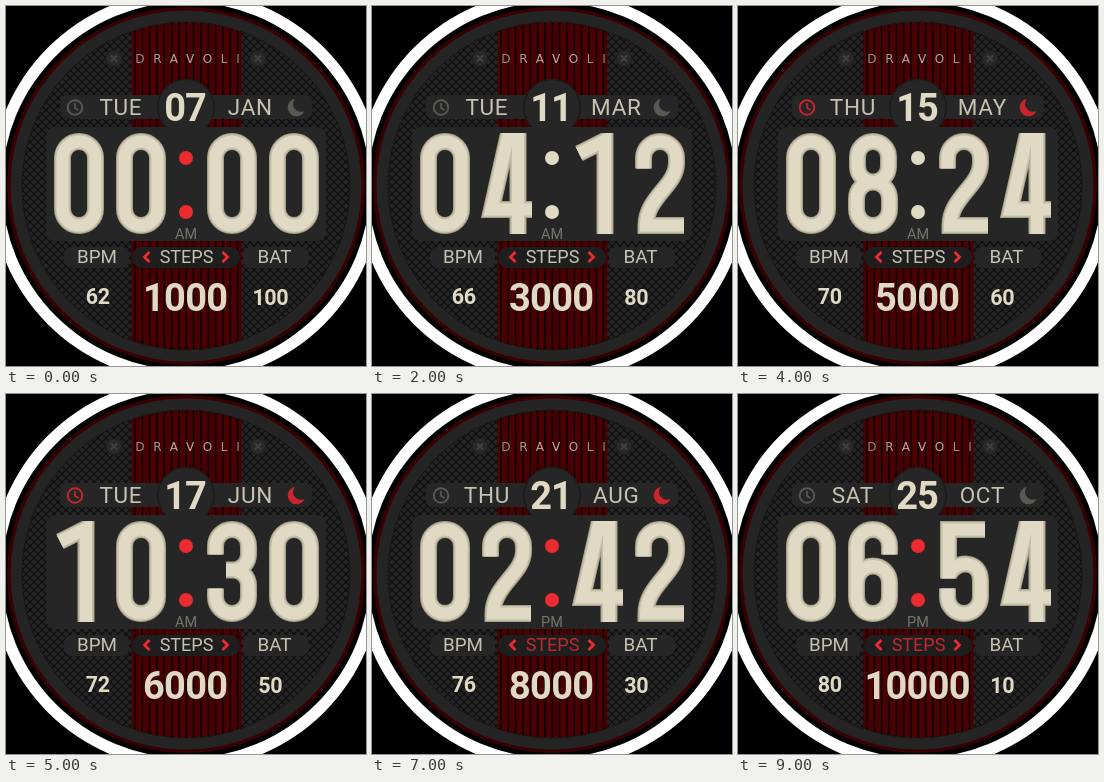
Animation, 360 px wide and 360 px high, one loop 10000 ms. Source, as an HTML page with a canvas:

```html
<!DOCTYPE html>
<html lang="en">
<head>
<meta charset="utf-8">
<title>Watch face</title>
<style>
html, body { margin: 0; width: 100%; height: 100%; overflow: hidden; background: #000; }
canvas { display: block; width: 360px; height: 360px; }
</style>
</head>
<body>
<canvas id="face"></canvas>
<script>
const SIZE = 360, C = 180, TAU = Math.PI * 2;
const CREAM = '#e0dac4', SOFT = '#c6c2b2', RED = '#ec2b30', DIM = '#5b5854', PANEL = '#262626';
const MONTHS = ['JAN', 'FEB', 'MAR', 'APR', 'MAY', 'JUN', 'JUL', 'AUG', 'SEP', 'OCT'];
const DAYS = ['SUN', 'MON', 'TUE', 'WED', 'THU', 'FRI', 'SAT'];

// Centre lines of the clock digits; x is centred, y runs from 0 to 84.
const GLYPHS = {
  0: 'M-16.5 16.5A16.5 16.5 0 0 1 16.5 16.5V67.5A16.5 16.5 0 0 1-16.5 67.5Z',
  1: 'M-19 12L7-1V94',
  2: 'M-16.5 27V16.5A16.5 16.5 0 0 1 16.5 16.5V22C16.5 44-14 56-14 84H24',
  3: 'M-16.5 25V16.5A16.5 16.5 0 0 1 16.5 16.5V25A15.5 15.5 0 0 1 1 40.5H-6M1 40.5A15.5 15.5 0 0 1 16.5 56V67.5A16.5 16.5 0 0 1-16.5 67.5V59',
  4: 'M11 94V-9M2-10L-15.5 68H25',
  5: 'M21 0H-15.5V49M-15.5 46C-9 30 16.5 30 16.5 51V67.5A16.5 16.5 0 0 1-16.5 67.5V59',
  6: 'M16.5 25V16.5A16.5 16.5 0 0 0-16.5 16.5V67.5A16.5 16.5 0 0 0 16.5 67.5V53A16.5 16.5 0 0 0-16.5 53',
  8: 'M-15.5 15.5A15.5 15.5 0 0 1 15.5 15.5V25A15.5 15.5 0 0 1-15.5 25ZM-16.5 57A16.5 16.5 0 0 1 16.5 57V67.5A16.5 16.5 0 0 1-16.5 67.5Z'
};
const SLOTS = [73, 135, 226, 288];

const canvas = document.getElementById('face');
const dpr = window.devicePixelRatio || 1;
const ctx = setup(canvas);
const backdrop = document.createElement('canvas');
drawBackdrop(setup(backdrop));

function setup(el) {
  el.width = el.height = SIZE * dpr;
  const g = el.getContext('2d');
  g.scale(dpr, dpr);
  return g;
}

function disc(g, x, y, r, fill) {
  g.beginPath();
  g.arc(x, y, r, 0, TAU);
  g.fillStyle = fill;
  g.fill();
}

function ring(g, x, y, r, width, color) {
  g.beginPath();
  g.arc(x, y, r, 0, TAU);
  g.lineWidth = width;
  g.strokeStyle = color;
  g.stroke();
}

function panel(g, x, y, w, h, r, fill) {
  g.beginPath();
  g.roundRect(x, y, w, h, r);
  g.fillStyle = fill;
  g.fill();
}

function line(g, color, width, ...pts) {
  g.beginPath();
  for (let i = 0; i < pts.length; i += 2) g.lineTo(pts[i], pts[i + 1]);
  g.strokeStyle = color;
  g.lineWidth = width;
  g.stroke();
}

function label(g, str, x, y, size, color, weight = 400, gap = 0, family = 'Roboto') {
  g.font = `${weight} ${size}px ${family}, sans-serif`;
  g.letterSpacing = gap + 'px';
  g.textAlign = 'center';
  g.fillStyle = color;
  g.fillText(str, x + gap / 2, y);
}

// Mesh and red stripe, both seen through the round opening of the bezel.
function drawDial(g) {
  g.save();
  g.beginPath();
  g.arc(C, C, 164, 0, TAU);
  g.clip();
  for (let d = -SIZE; d < SIZE * 2; d += 8) {
    line(g, '#0c0c0c', 1.1, d, 0, d + SIZE, SIZE);
    line(g, '#0c0c0c', 1.1, d, 0, d - SIZE, SIZE);
  }
  g.fillStyle = '#480002';
  g.fillRect(125.5, 0, 110, SIZE);
  for (let x = 129; x < 235; x += 7.33) line(g, '#0c0000', 1.5, x, 0, x, SIZE);
  g.restore();
}

function drawScrew(g, x) {
  disc(g, x, 52.5, 8.5, '#292929');
  ring(g, x, 52.5, 8, 1, '#1c1c1c');
  line(g, '#414141', 2, x - 3, 49.5, x + 3, 55.5);
  line(g, '#414141', 2, x + 3, 49.5, x - 3, 55.5);
}

function chevron(g, x, dir) {
  line(g, RED, 2.8, x + 2.5 * dir, 246, x - 2.5 * dir, 251, x + 2.5 * dir, 256);
}

function drawBackdrop(g) {
  g.fillStyle = '#000';
  g.fillRect(0, 0, SIZE, SIZE);
  disc(g, C, C, 195.5, '#fff');
  disc(g, C, C, 184, '#000');
  disc(g, C, C, 179, '#380003');
  disc(g, C, C, 175.5, '#242424');
  drawDial(g);
  ring(g, C, C, 164, 1, '#161616');

  drawScrew(g, 108);
  drawScrew(g, 252);
  const metal = g.createLinearGradient(128, 0, 236, 0);
  metal.addColorStop(0, '#8d887e');
  metal.addColorStop(0.5, '#b9b4a7');
  metal.addColorStop(1, '#8d887e');
  label(g, 'DRAVOLI', 181.5, 56.5, 12, metal, 400, 8.7, 'DejaVu Sans');

  panel(g, 54, 89, 252, 24, 7, PANEL);
  disc(g, C, 101.5, 29, '#1b1b1b');
  disc(g, C, 101.5, 27.5, PANEL);
  panel(g, 40, 121, 280, 114, 9, PANEL);
  panel(g, 58, 241, 65, 21, 8, PANEL);
  panel(g, 126, 241, 108, 21, 10, '#1e1e1e');
  panel(g, 237, 241, 66, 21, 8, PANEL);
  label(g, 'BPM', 91, 257, 18.8, SOFT);
  label(g, 'BAT', 268.5, 257, 18.8, SOFT);
  chevron(g, 141, 1);
  chevron(g, 219, -1);
}

function drawDigit(ch, slot) {
  const path = new Path2D(GLYPHS[ch]);
  ctx.save();
  ctx.beginPath();
  ctx.rect(40, 127, 280, 101);
  ctx.clip();
  ctx.translate(SLOTS[slot], 135.5);
  [[17, '#a39e88'], [15, '#c6c0a9'], [12, CREAM]].forEach(([width, color]) => {
    ctx.lineWidth = width;
    ctx.strokeStyle = color;
    ctx.stroke(path);
  });
  ctx.restore();
}

function drawAlarm(color) {
  ring(ctx, 69, 101.5, 7.3, 1.9, color);
  line(ctx, color, 1.7, 69, 97, 69, 102, 72.5, 104);
}

function drawMoon(color) {
  ctx.beginPath();
  ctx.arc(290.5, 101.5, 8.8, -1.75, 0.45, true);
  ctx.quadraticCurveTo(291, 107, 287.5, 101);
  ctx.quadraticCurveTo(286.2, 96.5, 288.9, 92.8);
  ctx.fillStyle = color;
  ctx.fill();
}

function drawState(n) {
  ctx.drawImage(backdrop, 0, 0, SIZE, SIZE);
  const two = v => String(v).padStart(2, '0');
  const day = 7 + 2 * n;
  const weekday = DAYS[new Date(2025, n, day).getDay()];

  drawAlarm(n >= 3 && n <= 6 ? '#c9252d' : DIM);
  drawMoon(n >= 4 && n <= 7 ? '#c9252d' : DIM);
  label(ctx, weekday, 114.5, 109, 22.5, SOFT, 400, 0.7);
  label(ctx, MONTHS[n], 244, 109, 22.5, SOFT, 400, 0.7);
  label(ctx, two(day), 179.5, 114.5, 38, CREAM, 700, -1);

  [...two(2 * n % 12) + two(6 * n)].forEach(drawDigit);
  const dots = n >= 1 && n <= 4 ? CREAM : RED;
  disc(ctx, C, 152, 7, dots);
  disc(ctx, C, 206, 7, dots);
  label(ctx, n < 6 ? 'AM' : 'PM', C, 232.5, 14.5, '#75726a');

  label(ctx, 'STEPS', 180.5, 257, 18, n >= 7 ? '#c4282d' : SOFT);
  label(ctx, String(62 + 2 * n), 92, 298, 21.5, CREAM, 600, -0.4);
  label(ctx, String(1000 * (n + 1)), 179.5, 305, 38, CREAM, 700, -0.7);
  label(ctx, String(100 - 10 * n), 264.5, 298.5, 21.5, CREAM, 600, -0.4);
}

function frame() {
  drawState(Math.floor(performance.now() / 1000) % 10);
  requestAnimationFrame(frame);
}
frame();
</script>
</body>
</html>
```
